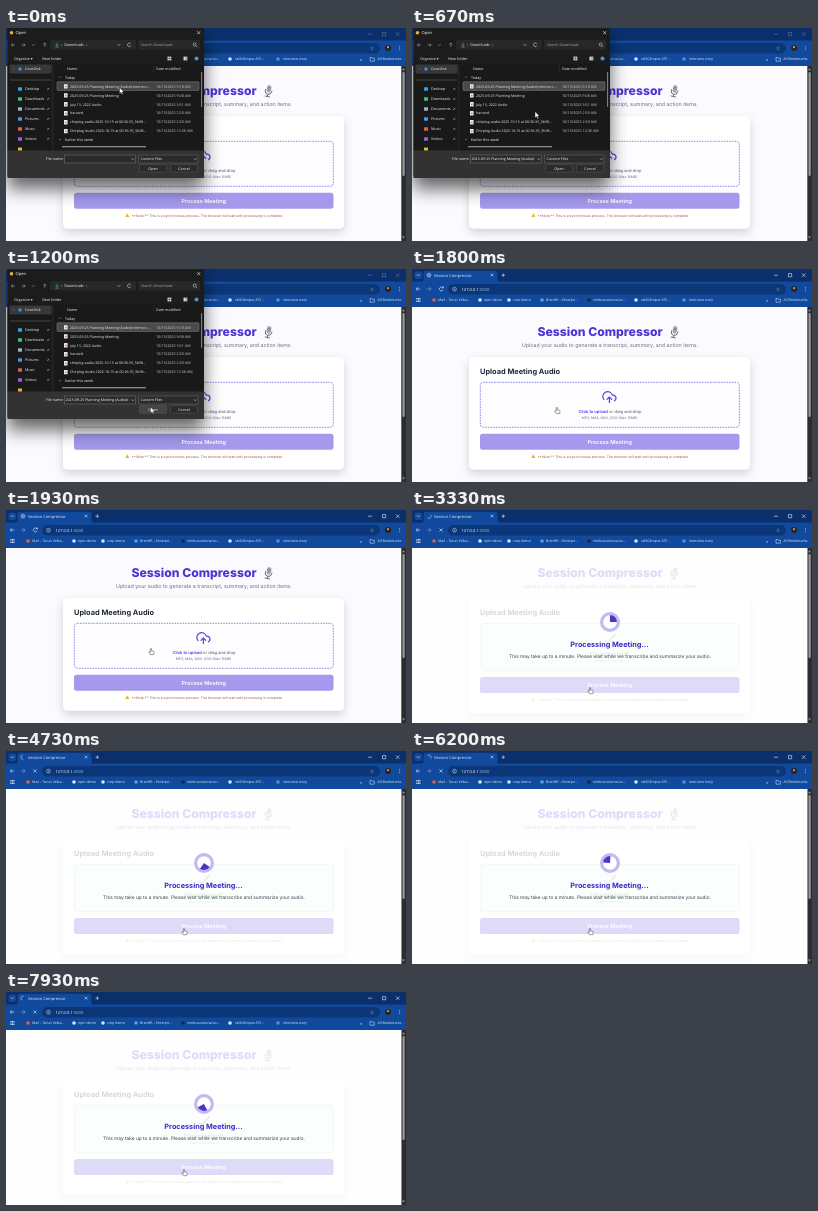
Animation of 400 by 213 pixels, one loop 8 s. Source, as an HTML page:

```html
<!DOCTYPE html>
<html lang="en">
<head>
<meta charset="utf-8">
<title>Session Compressor</title>
<style>
  html, body { margin: 0; width: 100%; height: 100%; overflow: hidden; background: #fafaff; }
  svg { display: block; width: 100vw; height: 100vh; text-rendering: geometricPrecision; }
  text { font-family: "Open Sans", "Noto Sans", sans-serif; white-space: pre; }
  .page text { font-family: Inter, Roboto, sans-serif; }
</style>
</head>
<body>
<svg id="stage" viewBox="0 0 400 213" preserveAspectRatio="none"></svg>
<script>
const LOOP = 8000, FILE_PICKED = 200, DIALOG_CLOSED = 1400, UPLOADED = 2230, SUBMITTED = 3160;
const SPIN_PERIOD = 1040;
const CARD_HEIGHT = 112.6, UPLOADED_GROWTH = 2.3;

const text = (x, y, size, fill, str, attrs = '') =>
  `<text x="${x}" y="${y}" font-size="${size}" fill="${fill}" ${attrs}>${str}</text>`;
const rect = (x, y, w, h, fill, attrs = '') =>
  `<rect x="${x}" y="${y}" width="${w}" height="${h}" fill="${fill}" ${attrs}/>`;
const dot = (x, y, r, fill) => `<circle cx="${x}" cy="${y}" r="${r}" fill="${fill}"/>`;
const line = (d, stroke, width = 0.6, attrs = '') =>
  `<path d="${d}" fill="none" stroke="${stroke}" stroke-width="${width}" ${attrs}/>`;
const group = (id, content, attrs = '') => `<g id="${id}" ${attrs}>${content}</g>`;
const MID = 'text-anchor="middle"';
const bold = weight => ` font-weight="${weight}"`;

function browser() {
  const ink = '#e6eefb';
  const bookmarks = [
    [22, 26, '#e8604c', 'Mail – Tarun Velka…'], [68, 72, '#d6e4ff', 'npm demo'],
    [97, 101, '#d6e4ff', 'corp demo'], [130, 134, '#4ea3f0', 'BrenHR – Enterpri…'],
    [177, 181, '#15254a', 'nimbusvolarna/ux…'], [224, 229, '#d6e4ff', 'skillGlimpse ATS –'],
    [272, 277, '#4e8ff0', 'interview story']];
  return rect(0, 0, 400, 13, '#0a2f6b') +
    rect(0, 12.5, 400, 25.5, '#114a9c') +
    rect(2.5, 2.5, 7.5, 7.5, '#114a9c', 'rx="2"') +
    `<path d="M9 13Q11.5 13 11.5 10.5V4Q11.5 1.8 14 1.8H83Q85.5 1.8 85.5 4V10.5Q85.5 13 88 13Z" fill="#114a9c"/>` +
    line('M4.8 5.4l1.5 1.5 1.5-1.5M78.8 4.8l2.6 2.6m0-2.6l-2.6 2.6M89.5 6.2h3.6m-1.8-1.8v3.6', ink) +
    group('windowButtons', line('M362 6.2h4M376.5 4.6h3.2v3.2h-3.2zM390 4.5l3.4 3.4m0-3.4l-3.4 3.4', ink)) +
    text(22, 7.8, 4, ink, 'Session Compressor') +
    rect(36, 15, 338, 10.4, '#0b3677', 'rx="5.2"') +
    line('M8.2 20H4.3m1.7-1.8L4.2 20l1.8 1.8', ink) +
    line('M15 20h4m-1.7-1.8L19.1 20l-1.8 1.8', '#8aa6d2') +
    group('reload', line('M31 18.8a2 2 0 1 0 .2 2M31.4 17.4v1.6h-1.7', ink)) +
    group('stop', line('M27.5 18.5l3 3m0-3l-3 3', ink)) +
    `<circle cx="42.5" cy="20.2" r="1.9" fill="none" stroke="${ink}" stroke-width=".5"/>` +
    line('M42.5 19.9v1.2m0-2.1v.4', ink, 0.5) +
    `<text x="49.5" y="21.6" font-size="4.1" fill="#fff">127.0.0.1<tspan fill="#a9bfe2">:5000</tspan></text>` +
    text(366, 22.2, 5, ink, '☆', MID) +
    dot(382, 20, 3, '#29231f') + dot(382, 19.2, 1.1, '#c99a78') +
    [18.3, 20, 21.7].map(y => dot(393.5, y, 0.45, ink)).join('') +
    [0, 1, 2].flatMap(i => [0, 1, 2].map(j => rect(4.4 + i * 1.5, 29 + j * 1.5, 1, 1, ink))).join('') +
    bookmarks.map(([ix, x, color, label]) =>
      dot(ix, 31, 1.8, color) + text(x, 32.4, 3.5, ink, label)).join('') +
    text(354, 32.5, 4.5, ink, '»') + line('M364 29.5h1.6l.6.7h2.2v3h-4.4z', ink, 0.5) +
    text(371.5, 32.4, 3.6, ink, 'All Bookmarks') +
    group('favicon', line('M15 6.2a2 2 0 1 1 4 0 2 2 0 1 1-4 0zM15 6.2h4M17 4.2v4', '#c9d9f4', 0.5)) +
    group('tabSpinner', line('M17 4.1a2.1 2.1 0 0 1 0 4.2', '#8fbcff', 0.7));
}

function microphone() {
  return `<g transform="translate(262.5 63) rotate(12)">` +
    rect(-2.1, -6, 4.2, 7.6, '#a8a6b4', 'rx="2.1"') +
    line('M-2 -3.6h4M-2 -2h4', '#74717f', 0.5) +
    line('M-3.2 -1.2v1.4a3.2 3.2 0 0 0 6.4 0v-1.4M0 3.4v2M-2.6 5.6h5.2', '#6b6876', 0.9) + '</g>';
}

function page() {
  const box = (height, fill, stroke) =>
    rect(68.3, 113.3, 259, height, fill, `rx="3" stroke="${stroke}" stroke-width=".8" stroke-dasharray="1.7 1"`);
  const empty = box(45, '#fdfdff', '#7e70ea') +
    `<g transform="translate(190.2 120.8) scale(.6)" stroke-linecap="round" stroke-linejoin="round">` +
    line('M16 16l-4-4-4 4M12 12v9M20.39 18.39A5 5 0 0 0 18 9h-1.26A8 8 0 1 0 3 16.3', '#5644e2', 2) + '</g>' +
    `<text x="198" y="144.2" font-size="4.1" fill="#4b5563" ${MID}><tspan fill="#4f39e0" font-weight="600">Click to upload</tspan> or drag and drop</text>` +
    text(197.5, 149.6, 3.4, '#6b7280', 'MP3, M4A, WAV, OGG (Max 16MB)', MID);
  const done = box(45 + UPLOADED_GROWTH, '#f0fdf4', '#41cf76') +
    line('M192.3 129.6l3.4 3.6 7.8-9', '#5cc98a', 2) +
    text(197.5, 146.2, 5.7, '#16a34a', 'File uploaded!', MID + bold(700)) +
    text(198, 152.2, 3.4, '#6b7280', 'Ready to process.', MID);
  const actions =
    rect(68, 164.7, 259.5, 16, '#4b35da', 'rx="2.6" id="button"') +
    text(197.7, 174.6, 5.5, '#fff', 'Process Meeting', MID + bold(600)) +
    `<path d="M121.3 185.2l2 3.7h-4z" fill="#f2b31c"/>` +
    text(125.5, 188.7, 3.46, '#a05a4e', '**Note:** This is a synchronous process. The browser will wait until processing is complete.');
  return rect(0, 38, 400, 175, '#fafaff') +
    text(188, 67.2, 12.2, '#4b35d6', 'Session Compressor', MID + bold(800)) + microphone() +
    text(198, 77.6, 5.25, '#6b7280', 'Upload your audio to generate a transcript, summary, and action items.', MID) +
    rect(57, 88, 281, CARD_HEIGHT, '#fff', 'rx="5" filter="url(#cardShadow)" id="card"') +
    text(68, 105.3, 7.4, '#1f2937', 'Upload Meeting Audio', bold(700)) +
    group('emptyBox', empty) + group('doneBox', done) + group('actions', actions) +
    rect(395.3, 38, 4.7, 175, '#2c2c2c') + rect(396.5, 44, 2.2, 104, '#9a9a9a', 'rx="1.1"') +
    `<path d="M396 42.3l1.5-2 1.5 2zM396 208.5l1.5 2 1.5-2z" fill="#9a9a9a"/>`;
}

function overlay() {
  return rect(0, 38, 395.3, 175, '#fff', 'opacity=".82"') +
    `<circle cx="198" cy="112" r="8.4" fill="#fff" stroke="#c3b9f3" stroke-width="3.2"/>` +
    group('spinner', `<path d="M198 112L193.1 107.1A6.9 6.9 0 0 1 202.9 107.1Z" fill="#4b35c8"/>`) +
    text(197.5, 137.2, 7.3, '#3c27c8', 'Processing Meeting...', MID + bold(700)) +
    text(198, 148, 4.8, '#374151', 'This may take up to a minute. Please wait while we transcribe and summarize your audio.', MID);
}

function dialog() {
  const ink = '#f0f0f0', dim = '#a5a5a5';
  const files = [
    ['2025-09-25 Planning Meeting (Audio)trimmer.c…', '9:18 AM'], ['2025-09-25 Planning Meeting', '9:08 AM'],
    ['July 13, 2022 Audio', '3:51 AM'], ['harvard', '2:50 AM'],
    ['chirplog-audio-2025-10-15 at 00:36:35_5b98…', '2:50 AM'], ['Chirplog Audio 2025-10-15 at 00.36.35_5b98…', '12:36 AM']];
  const places = [['Desktop', '#35a3e8'], ['Downloads', '#3fc28a'], ['Documents', '#9fb3c8'],
    ['Pictures', '#3f9cf0'], ['Music', '#e0604c'], ['Videos', '#a05ce0']];
  const button = (x, label, id) =>
    rect(x, 136.6, 27, 7.6, '#2b2b2b', `rx="1" stroke="#666" stroke-width=".4" id="${id}"`) +
    text(x + 13.5, 141.8, 3.7, ink, label, MID);
  return rect(1.5, -1, 196.5, 151, '#1f1f1f', 'rx="2" filter="url(#dialogShadow)"') +
    rect(1.5, 35.5, 196.5, 87, '#191919') + rect(1.5, 122.5, 196.5, 27.5, '#323232', 'rx="1"') +
    dot(5.5, 4.8, 1.8, '#e3b53f') + text(9.5, 6.3, 4.1, '#fff', 'Open') +
    line('M191.2 3.2l3 3m0-3l-3 3', ink) +
    line('M9 17H5.4m1.6-1.6L5.3 17 7 18.6M15.5 17h3.6m-1.6-1.6 1.7 1.6-1.7 1.6M38.8 19v-4m-1.6 1.6 1.6-1.7 1.6 1.7M26 16.3l1.4 1.4 1.4-1.4', dim) +
    rect(44, 12, 86, 9.4, '#282828', 'rx="1"') + rect(132, 12, 62, 9.4, '#282828', 'rx="1"') +
    line('M51 14.5v3.6m-1.5-1.4 1.5 1.5 1.5-1.5M49.2 19.2h3.6', '#3fc28a') +
    text(55, 18.2, 3.8, ink, '›  Downloads  ›') +
    line('M111.5 16.2l1.4 1.4 1.4-1.4M124.8 15.8a1.8 1.8 0 1 0 .2 1.6', ink, 0.5) +
    text(135, 18.2, 3.7, dim, 'Search Downloads') +
    line('M189.9 17.8l1.3 1.3M190.2 16.5a1.5 1.5 0 1 1-3 0 1.5 1.5 0 0 1 3 0', ink, 0.5) +
    text(8, 31.6, 3.8, ink, 'Organize ▾') + text(36, 31.6, 3.8, ink, 'New folder') +
    rect(161.5, 28.6, 3.8, 3.8, '#d8d8d8') + rect(177.5, 28.6, 3.8, 3.8, '#d8d8d8') +
    line('M161.5 30.5h3.8M163.4 28.6v3.8M180 28.6v3.8', '#1f1f1f', 0.4) + dot(190.5, 30.4, 2, '#4b93e0') +
    rect(3.5, 36.5, 42, 9, '#383838', 'rx="1"') + dot(14, 41, 1.7, '#3a94e6') +
    line('M7 39.8l1.2 1.2-1.2 1.2M4 52h41', '#888', 0.4) + text(19, 42.3, 3.7, ink, 'CoveDisk') +
    places.map(([label, color], i) => {
      const y = 61 + i * 10;
      return rect(12, y - 1.7, 4, 3.4, color, 'rx=".6"') + text(19, y + 1.3, 3.7, ink, label) +
        line(`M43.2 ${y - 1.1}l-2.2 2.2m.6-2.2 1.6 1.6`, dim, 0.6);
    }).join('') +
    rect(12, 119.6, 4, 2.9, '#e3b53f', 'rx=".6"') +
    line('M46.8 36v86.5', '#3c3c3c', 0.5) +
    text(61, 41.8, 3.7, ink, 'Name') + text(150, 41.8, 3.7, ink, 'Date modified') +
    line('M147.5 37v7', '#3c3c3c', 0.4) +
    line('M53 48.6l1.2 1.2 1.2-1.2M53 111l1.2 1.2 1.2-1.2', dim, 0.5) +
    text(59, 51.3, 3.7, ink, 'Today') +
    rect(51, 53.8, 142, 8.6, '#444', 'rx=".8" stroke="#9a9a9a" stroke-width=".4" id="selected"') +
    files.map(([name, time], i) => {
      const y = 59.6 + i * 8.95;
      return rect(58, y - 3.4, 3.6, 4.4, '#eee', 'rx=".3"') + dot(59.8, y - 1, 0.9, '#e07a3f') +
        text(64, y, 3.58, ink, name) + text(150, y, 3.7, '#d0d0d0', '10/15/2025 ' + time);
    }).join('') +
    text(59, 113.4, 3.7, ink, 'Earlier this week') +
    rect(56, 118.3, 84, 1, '#b0b0b0', 'rx=".5"') + rect(195.2, 44, 0.9, 35, '#9a9a9a', 'rx=".4"') +
    text(40, 132.4, 3.7, ink, 'File name:') +
    rect(58.5, 127, 71, 8, '#2b2b2b', 'stroke="#888" stroke-width=".4"') +
    rect(132.5, 127, 59.5, 8, '#2b2b2b', 'stroke="#777" stroke-width=".4"') +
    text(134.5, 132.4, 3.7, ink, 'Custom Files') +
    line('M125.5 130.4l1.3 1.3 1.3-1.3M188 130.4l1.3 1.3 1.3-1.3', ink, 0.5) +
    group('fileName', text(59.5, 132.4, 3.6, '#fff', '2025-09-25 Planning Meeting (Audio)t')) +
    button(133.5, 'Open', 'openButton') + button(164.5, 'Cancel', 'cancelButton');
}

const shadow = (id, dy, blur, alpha) =>
  `<filter id="${id}" x="-20%" y="-20%" width="140%" height="160%"><feDropShadow dx="0" dy="${dy}" stdDeviation="${blur}" flood-color="#000" flood-opacity="${alpha}"/></filter>`;

const stage = document.getElementById('stage');
stage.innerHTML = '<defs>' + shadow('cardShadow', 4, 5, 0.16) + shadow('dialogShadow', 11, 9, 0.6) + '</defs>' +
  group('page', page(), 'class="page"') + group('overlay', overlay(), 'class="page"') +
  group('browser', browser()) + group('dialog', dialog()) +
  group('pointer',
    group('arrow', `<path d="M0 0V6.2L1.5 4.9 2.5 7.1 3.5 6.6 2.5 4.5H4.4Z" fill="#fff" stroke="#111" stroke-width=".4"/>`) +
    group('hand', `<path d="M-.6 .3Q0-.4.6.3V2.4L2.6 2.8Q3.3 3 3.2 3.8L2.7 6.2H-.6L-2.2 3.8Q-1.8 2.9-1.2 3.4L-.6 3.9Z" fill="#fff" stroke="#222" stroke-width=".45"/>`));

const el = id => document.getElementById(id);
const set = (id, name, value) => el(id).setAttribute(name, value);
const show = (id, visible) => set(id, 'display', visible ? 'inline' : 'none');
const clamp = v => Math.max(0, Math.min(1, v));
const ease = v => v * v * (3 - 2 * v);

// Pointer stops: time, x, y
const stops = [[0, 113.5, 59.5], [450, 113.5, 59.5], [1050, 144.5, 138], [2250, 145, 138.5],
  [2650, 170, 171.5], [3000, 170, 171.5], [3150, 178, 177.5], [LOOP, 178, 177.5]];

function pointerAt(t) {
  const i = stops.findIndex(stop => stop[0] > t);
  const [t0, x0, y0] = stops[i - 1], [t1, x1, y1] = stops[i];
  const k = ease((t - t0) / (t1 - t0));
  return [x0 + (x1 - x0) * k, y0 + (y1 - y0) * k];
}

function render(t) {
  const open = t < DIALOG_CLOSED, picked = t >= FILE_PICKED;
  const uploaded = t >= UPLOADED, busy = t >= SUBMITTED;
  show('dialog', open);
  show('arrow', open);
  show('hand', !open);
  show('fileName', picked);
  set('windowButtons', 'opacity', open ? 0.4 : 1);
  set('selected', 'fill', picked ? '#4a4a4a' : '#444');
  set('openButton', 'fill', t > 980 ? '#444' : '#2b2b2b');

  const growth = uploaded ? UPLOADED_GROWTH : 0;
  show('emptyBox', !uploaded);
  show('doneBox', uploaded);
  set('card', 'height', CARD_HEIGHT + growth);
  set('actions', 'transform', `translate(0 ${growth})`);
  set('button', 'opacity', uploaded ? 1 : 0.5);

  show('overlay', busy);
  set('overlay', 'opacity', clamp((t - SUBMITTED) / 100));
  show('favicon', !busy);
  show('tabSpinner', busy);
  show('reload', !busy);
  show('stop', busy);
  const angle = 45 + (t - 3330) / SPIN_PERIOD * 360;
  set('spinner', 'transform', `rotate(${angle} 198 112)`);
  set('tabSpinner', 'transform', `rotate(${angle} 17 6.2)`);

  const [x, y] = pointerAt(t);
  set('pointer', 'transform', `translate(${x} ${y})`);
}

const start = performance.now();
function tick() {
  render((performance.now() - start) % LOOP);
  requestAnimationFrame(tick);
}
tick();
</script>
</body>
</html>
```
